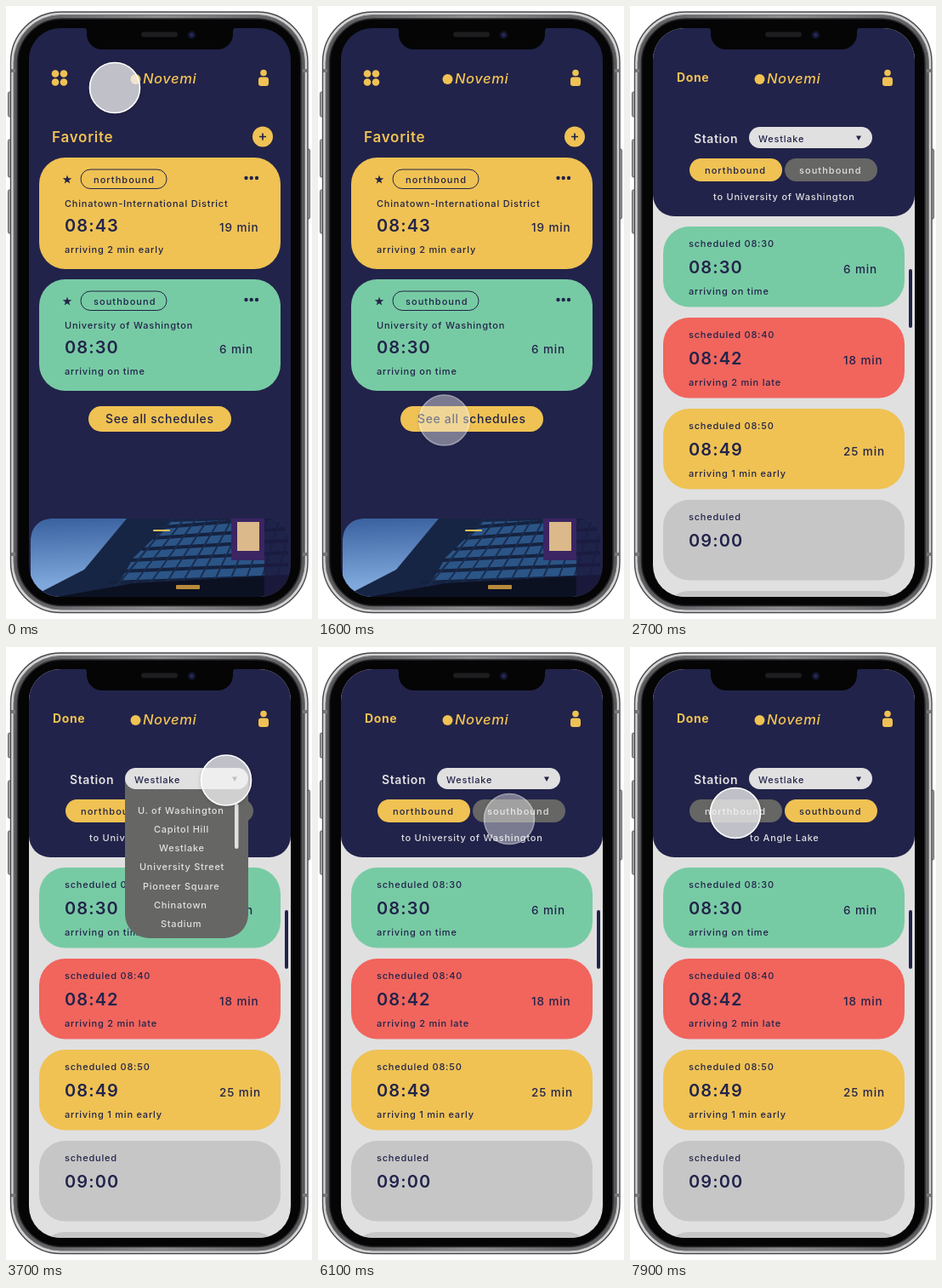
Animation of 360x720 px, one loop 8 s. Source, as an HTML page:

```html
<!DOCTYPE html>
<html lang="en">
<head>
<meta charset="utf-8">
<title>Transit schedule prototype</title>
<style>
html, body { margin: 0; width: 360px; height: 720px; overflow: hidden; background: #fff; }
svg { display: block; font-family: Inter, "Open Sans", sans-serif; }
text { white-space: pre; }
#touch { filter: drop-shadow(0 1px 2px #0003); }
</style>
</head>
<body>
<svg id="stage" width="360" height="720" viewBox="0 0 360 720"></svg>
<script>
const NAVY = '#22234a', YELLOW = '#efc253', GREEN = '#77cba4', RED = '#f1655d',
      GREY = '#c6c6c6', DARK = '#666665', PALE = '#e0e0e0', CORNER = 31;

const rect = (x, y, w, h, r, fill, more = '') =>
  `<rect x="${x}" y="${y}" width="${w}" height="${h}" rx="${r}" fill="${fill}" ${more}/>`;
const dot = (x, y, r, fill, more = '') => `<circle cx="${x}" cy="${y}" r="${r}" fill="${fill}" ${more}/>`;
const poly = (points, fill) => `<polygon points="${points}" fill="${fill}"/>`;
const line = (d, stroke, width) => `<path d="${d}" fill="none" stroke="${stroke}" stroke-width="${width}"/>`;
const text = (x, y, s, { size = 11, fill = NAVY, weight = 500, gap = .78, more = '' } = {}) =>
  `<text x="${x}" y="${y}" font-size="${size}" fill="${fill}" font-weight="${weight}" letter-spacing="${gap}" ${more}>${s}</text>`;
const group = (id, inner) => `<g id="${id}">${inner}</g>`;

const big = (x, y, s) => text(x, y, s, { size: 20, weight: 600, gap: 1.1 });
const wait = (y, s) => text(251, y, s, { size: 13.5, gap: .9 });
const pillText = (x, y, s, fill) => text(x, y, s, { gap: 1.05, fill });

function topBar() {
  return dot(152.5, 86, 6, YELLOW) +
    text(161, 91, 'Novemi', { size: 16.5, fill: YELLOW, gap: .6, more: 'font-style="italic"' }) +
    dot(303, 78.5, 3.8, YELLOW) + rect(297, 83.5, 12, 10.5, 3.2, YELLOW);
}

function star(x, y) {
  const points = Array.from({ length: 10 }, (_, i) => {
    const a = i * Math.PI / 5, r = i % 2 ? 2.2 : 5.6;
    return `${x + r * Math.sin(a)},${y - r * Math.cos(a)}`;
  });
  return poly(points.join(' '), NAVY);
}

function favorite(y, fill, way, place, time, mins, note) {
  return rect(39, y, 284, 131, CORNER, fill) + star(72, y + 26) +
    rect(88, y + 14, 101, 22.5, 11.2, 'none', `stroke="${NAVY}"`) + pillText(103, y + 29.5, way, NAVY) +
    [282.5, 288.7, 295].map(x => dot(x, y + 24, 2.2, NAVY)).join('') +
    text(69, y + 58, place) + big(69, y + 87, time) + wait(y + 87, mins) + text(69, y + 112, note);
}

// Dusk view of a glass building
function photo() {
  let s = rect(29, 602, 303, 110, 24, 'url(#sky)') +
    poly('142,602 332,602 332,694 30,694 92,662', '#172544') +
    poly('194,606 332,602 332,668 134,676 150,648', '#2b5587');
  for (let i = 0; i < 6; i++) s += line(`M${186 - i * 13} ${612 + i * 13}L332 ${600 + i * 14}`, '#15223f', 4);
  for (let i = 0; i < 11; i++) s += line(`M${196 + i * 14} 602L${126 + i * 19} 686`, '#1a2c4e', 2);
  s += poly('60,694 150,678 332,668 332,694', '#0c1122') +
    rect(200, 680, 28, 5, 1, '#b98a3c') +
    rect(304, 602, 28, 92, 0, '#1d1a40', 'opacity=".85"') +
    rect(265, 602, 39, 49, 0, '#3b2563') + rect(272, 606, 26, 34, 0, '#dcb98a') +
    rect(173, 615, 20, 2, 1, YELLOW);
  return `<g clip-path="url(#photoClip)">${s}</g>`;
}

function home() {
  return rect(27, 26, 308, 668, 0, NAVY) +
    [58, 68].map(x => dot(x, 79.5, 4.3, YELLOW) + dot(x, 89.5, 4.3, YELLOW)).join('') + topBar() +
    text(54, 160, 'Favorite', { size: 17, weight: 600, fill: YELLOW, gap: .75 }) +
    dot(302, 153.5, 12, YELLOW) + line('M298 153.5h8M302 149.5v8', NAVY, 1.7) +
    favorite(178, YELLOW, 'northbound', 'Chinatown-International District', '08:43', '19 min', 'arriving 2 min early') +
    favorite(321, GREEN, 'southbound', 'University of Washington', '08:30', '6 min', 'arriving on time') +
    rect(97, 470, 168, 30, 15, YELLOW) + text(117, 490, 'See all schedules', { size: 14, gap: .65 }) + photo();
}

function trip(y, fill, due, time, mins = '', note = '') {
  return rect(39, y, 284, 94.5, CORNER, fill) + text(69, y + 24, 'scheduled ' + due) +
    big(69, y + 55, time) + wait(y + 55, mins) + text(69, y + 80, note);
}

function list() {
  return rect(27, 26, 308, 668, 0, PALE) +
    trip(259, GREEN, '08:30', '08:30', '6 min', 'arriving on time') +
    trip(366, RED, '08:40', '08:42', '18 min', 'arriving 2 min late') +
    trip(473, YELLOW, '08:50', '08:49', '25 min', 'arriving 1 min early') +
    trip(580, GREY, '', '09:00') + rect(39, 687, 284, 95, CORNER, GREY);
}

// The two direction pills with the destination line
function direction(north, x, destination) {
  const pill = (px, tx, s, on) => rect(px, 179, 109, 27, 13.5, on ? YELLOW : DARK) +
    pillText(tx, 197, s, on ? NAVY : PALE);
  return pill(70, 88, 'northbound', north) + pill(182, 199, 'southbound', !north) +
    text(x, 228, destination, { fill: PALE });
}

function menu() {
  const items = [[155, 'U. of Washington'], [174, 'Capitol Hill'], [180, 'Westlake'], [157, 'University Street'],
    [161, 'Pioneer Square'], [174, 'Chinatown'], [182, 'Stadium']];
  return `<path d="M140 154h145v160a28 28 0 0 1-28 28h-89a28 28 0 0 1-28-28z" fill="${DARK}"/>` +
    items.map(([x, s], i) => text(x, 195.7 + i * 22.25, s, { fill: PALE, gap: .72 })).join('') +
    rect(269, 184, 4.5, 53, 2.2, PALE);
}

function header() {
  return rect(27, -20, 308, 267, 25, NAVY) + topBar() +
    text(55, 89, 'Done', { size: 14, weight: 700, fill: YELLOW, gap: .6 }) +
    text(75, 161, 'Station', { size: 14, weight: 600, fill: PALE, gap: .6 }) +
    group('north', direction(true, 98, 'to University of Washington')) +
    group('south', direction(false, 141, 'to Angle Lake')) + group('menu', menu()) +
    rect(140, 142, 145, 25, 12.5, PALE) + text(151, 160, 'Westlake') +
    poly('266,152.5 272,152.5 269,158', NAVY) + rect(328, 309, 4, 69, 2, NAVY);
}

function phone() {
  const buttons = [[2.5, 101, 29], [2.5, 157, 44], [2.5, 216, 51], [353.5, 168, 82]];
  const bands = [[6, 74], [349, 74], [6, 642], [349, 642]];
  return buttons.map(([x, y, h]) => rect(x, y, 4, h, 1.5, '#a5a5a7', 'stroke="#333" stroke-width=".7"')).join('') +
    rect(5.5, 7, 349.5, 705.5, 59, '#d4d4d6', 'stroke="#4a4a4c" stroke-width="1.4"') +
    rect(9, 10.5, 342.5, 698.5, 56, 'url(#metal)', 'stroke="#77777a" stroke-width="1"') +
    bands.map(([x, y]) => rect(x, y, 5, 4, 0, '#77777a')).join('') +
    rect(13.5, 15, 333.5, 689.5, 52, '#050506', 'stroke="#2a2a2c" stroke-width="1.5"');
}

function notch() {
  return '<path d="M90 25q5 0 5 5v3a18 18 0 0 0 18 18h136a18 18 0 0 0 18-18v-3q0-5 5-5z" fill="#050506"/>' +
    rect(159, 30.5, 43, 6, 3, '#1d1d1f') + dot(218.5, 34, 4.5, '#14162e') + dot(218.5, 34, 2, '#282b62');
}

const stage = document.getElementById('stage');
stage.innerHTML = `<defs>
  <clipPath id="screenClip">${rect(27, 26, 308, 668, 37, '#000')}</clipPath>
  <clipPath id="photoClip">${rect(29, 602, 303, 110, 24, '#000')}</clipPath>
  <linearGradient id="sky" x1=".1" y1="0" x2=".2" y2="1"><stop stop-color="#3a62a0"/><stop offset=".7" stop-color="#7fa8dc"/></linearGradient>
  <linearGradient id="metal"><stop stop-color="#58585b"/><stop offset=".5" stop-color="#8d8d90"/><stop offset="1" stop-color="#58585b"/></linearGradient>
  </defs>` + phone() +
  `<g clip-path="url(#screenClip)">${group('home', home()) + group('list', list()) + group('header', header())}</g>` +
  notch() + group('touch', dot(0, 0, 29.5, '#fff', 'fill-opacity=".72" stroke="#fff" stroke-width="1.6"'));

const part = id => document.getElementById(id);
const show = (id, on) => part(id).setAttribute('visibility', on ? 'inherit' : 'hidden');
const move = (id, x, y = 0) => part(id).setAttribute('transform', `translate(${x} ${y})`);
const clamp = v => Math.max(0, Math.min(1, v));

const LOOP = 8000, STEP = 100, WIDTH = 308, FADE = 180;
// x, y, first and last moment of each touch
const taps = [[128, 96, -500, 350], [148.5, 486.5, 1500, 2200], [259, 156.5, 3150, 4150],
  [115.5, 156, 4700, 5300], [225, 202, 6000, 6600], [124, 195, 7650, 8500]];

function draw(now) {
  const t = Math.floor(now % LOOP / STEP) * STEP;

  const slide = 1 - (1 - clamp((t - 1680) / 320)) ** 3;
  move('home', -WIDTH * slide);
  move('list', WIDTH * (1 - slide));
  show('header', t >= 2100);
  show('menu', t >= 3350 && t < 5050);
  show('north', t < 6250);
  show('south', t >= 6250);

  const tap = taps.find(([, , from, to]) => t > from && t < to);
  show('touch', tap);
  if (tap) {
    const [x, y, from, to] = tap;
    move('touch', x, y);
    part('touch').setAttribute('opacity', clamp(Math.min(t - from, to - t) / FADE));
  }
}

const start = performance.now();
function tick() {
  draw(performance.now() - start);
  requestAnimationFrame(tick);
}
tick();
</script>
</body>
</html>
```
